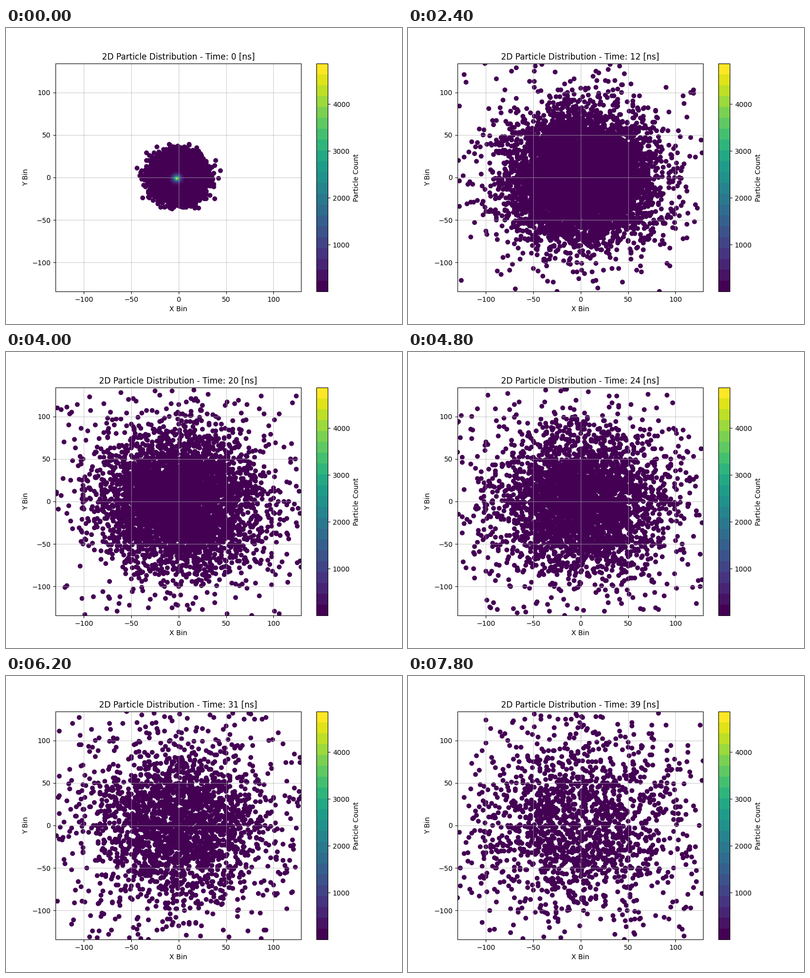
Recreate the animation shown at these times as a matplotlib script. Size 800 px wide and 600 px high, loop 8 s.

```python
import numpy as np
import matplotlib.pyplot as plt
from matplotlib.animation import FuncAnimation

FRAMES, STEP_MS = 40, 200
X_MIN, X_MAX, Y_LIM = -130, 129, 134
PEAK = 4865
PER_BIN = 0.0388  # bin probability for one marker area of coverage

bx, by = np.meshgrid(np.arange(X_MIN, X_MAX + 1),
                     np.arange(-Y_LIM, Y_LIM + 1), indexing="ij")
radius = np.hypot(bx, by)


def bell(d, width):
    return np.exp(-d**2 / (2 * width**2))


def ramp(t, start, length):
    return np.clip((t - start) / length, 0, 1)


def expected(t):
    """Mean particle count in every bin at time t."""
    spread = 10.8 + 19.2 * (1 - np.exp(-t / 2.5))
    level = (36 * np.exp(-0.105 * (t - 8)) + 1) * (30 / spread)**2
    cover = level * bell(radius, spread + 0.42 * t)
    cover += 0.35 * ramp(t, 4, 12) * bell(radius, 90)
    cover -= 1.2 * ramp(t, 35, 4) * bell(radius, 15)
    wall = 0.03 * ramp(t, 8, 8) * (abs(abs(bx) - 102) <= 1) * bell(by, 32)
    soft = np.sqrt(radius**2 + 1) - 1
    hot = PEAK * np.exp(-2 * t) * np.exp(-soft / (2.15 + 2 * t))
    return np.maximum(cover * PER_BIN + wall + hot, 0)


def sample(t):
    counts = np.random.default_rng(100 + t).poisson(expected(t))
    hit = counts > 0
    return np.column_stack([bx[hit], by[hit]]), counts[hit]


fig, ax = plt.subplots(figsize=(8, 6), dpi=100)
dots = ax.scatter([0], [0], c=[1], cmap=plt.get_cmap("viridis", 21),
                  vmin=1, vmax=PEAK)
fig.colorbar(dots, ax=ax, label="Particle Count")
ax.set(xlim=(X_MIN, X_MAX), ylim=(-Y_LIM, Y_LIM),
       xlabel="X Bin", ylabel="Y Bin")
ax.grid(True, linewidth=0.5)


def update(t):
    points, counts = sample(t)
    dots.set_offsets(points)
    dots.set_array(counts)
    ax.set_title(f"2D Particle Distribution - Time: {t} [ns]")
    return (dots,)


anim = FuncAnimation(fig, update, frames=FRAMES, interval=STEP_MS,
                     repeat=True, repeat_delay=0)
plt.show()
```
